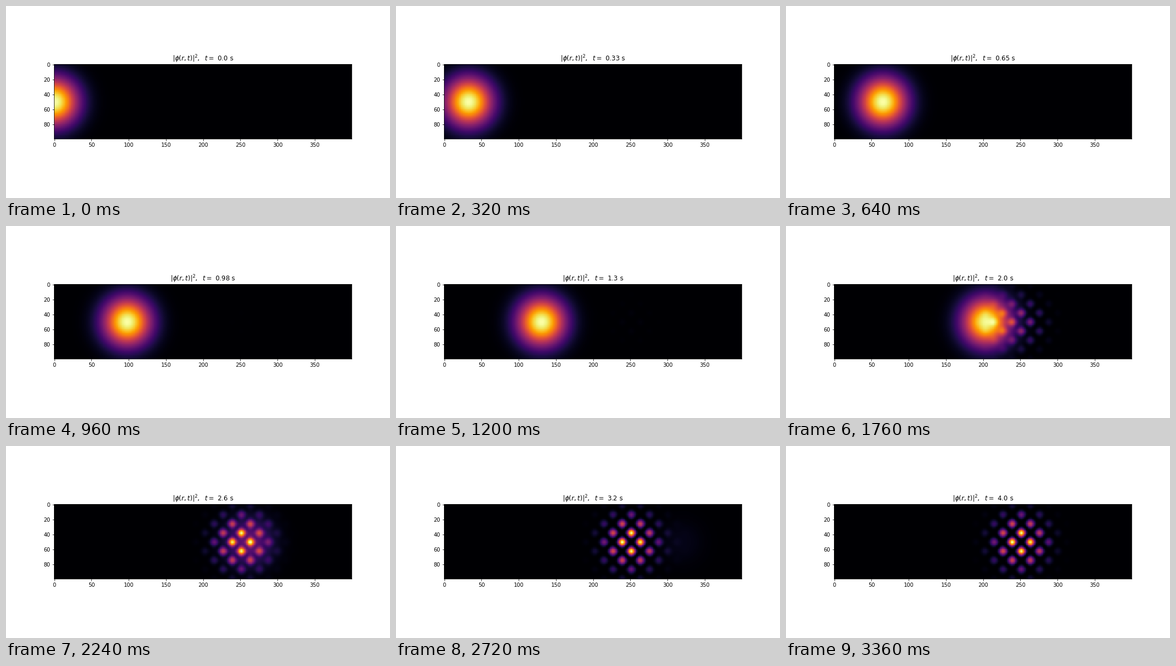
Recreate the animation shown at these times as a matplotlib script. Size 720 by 360 pixels, loop 3.44 s.

```python
import numpy as np
import matplotlib.pyplot as plt
from matplotlib.animation import FuncAnimation

plt.rcParams["font.family"] = "DejaVu Sans"

NX, NY = 400, 100
SPEED = 100.0        # cells per second
WIDTH2 = 1000.0      # squared 1/e radius of the density
X, Y = np.meshgrid(np.arange(NX), np.arange(NY))


def packet(x0, y0=50):
    return np.exp(-((X - x0) ** 2 + (Y - y0) ** 2) / WIDTH2)


LATTICE = packet(250) * ((np.cos(X / 4) - np.cos(Y / 4)) / 2) ** 2
LATTICE /= LATTICE.max()

# Times sharing a two-digit label collapse to the latest one.
TIMES = {f"{t:.2}": t for t in np.linspace(0, 4, 50)}
STEPS = list(TIMES.items())


def density(t):
    trapped = 1 / (1 + np.exp(-3.8 * (t - 2.35)))
    rho = (1 - trapped) * packet(SPEED * t) + trapped * LATTICE
    return rho / rho.max()


fig, ax = plt.subplots(figsize=(10, 5), dpi=72, facecolor="white")
fig.subplots_adjust(left=0.125, right=0.9, bottom=0.125, top=0.88)
image = ax.imshow(density(0), cmap="inferno", vmin=0, vmax=1,
                  interpolation="nearest")
title = ax.set_title("", fontsize=12)


def draw(i):
    label, t = STEPS[i]
    image.set_data(density(t))
    title.set_text(rf"$|\phi(r,t)|^2,\ \ t=$ {label} s")
    return image, title


anim = FuncAnimation(fig, draw, frames=len(STEPS), interval=80,
                     repeat=True, repeat_delay=0, blit=False)
plt.show()
```
